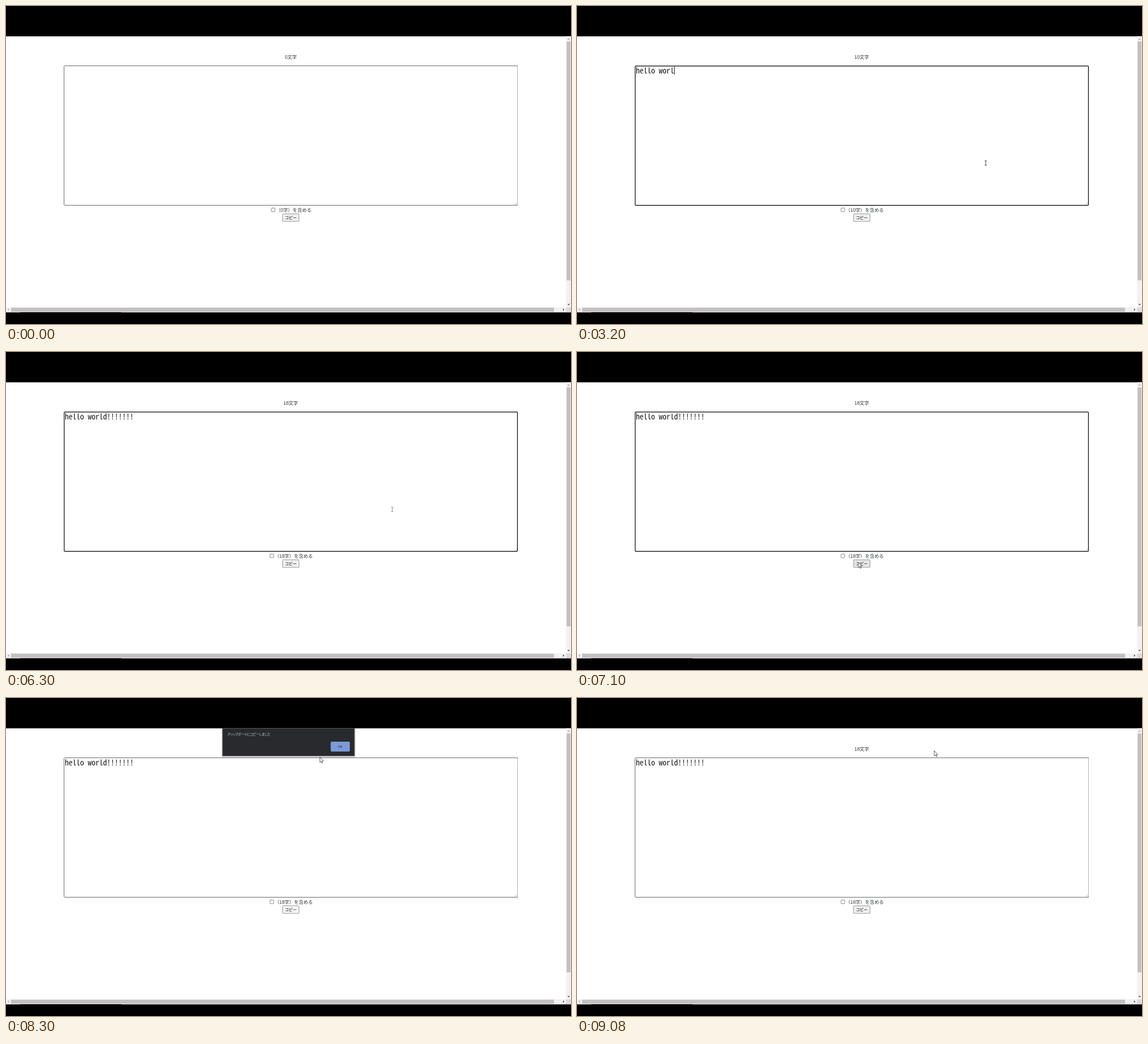
Animation of 998 by 561 pixels, one loop 9.18 s. Source, as an HTML page:

```html
<!DOCTYPE html>
<html lang="ja">
<head>
<meta charset="utf-8">
<title>文字数カウント</title>
<style>
  html, body { margin: 0; width: 100%; height: 100%; overflow: hidden; background: #000; }
  svg { display: block; width: 998px; height: 561px; }
  text { white-space: pre; }
  .label { font: 8.32px "Liberation Sans", "Noto Sans CJK JP", sans-serif; fill: #31383e; text-anchor: middle; }
  .button { font: 500 6.95px "Noto Sans CJK JP", sans-serif; text-anchor: middle; }
  .typed { font: 13.5px "Noto Sans Mono CJK JP", "Noto Sans Mono", monospace; fill: #111; text-anchor: middle; }
  .message { font: 6px "Noto Sans CJK JP", sans-serif; font-feature-settings: "palt"; letter-spacing: -.35px; fill: #c3c6c9; }
  .ok { font: 5.6px "Liberation Sans", sans-serif; fill: #202124; text-anchor: middle; }
</style>
</head>
<body>
<svg viewBox="0 0 998 561">
  <defs><clipPath id="page"><rect y="53.4" width="998" height="487.6"/></clipPath></defs>
  <rect width="998" height="561"/>
  <g clip-path="url(#page)">
    <rect y="53" width="998" height="488" fill="#fff"/>

    <!-- scrollbars -->
    <path d="M989.3 53H998V531.5H989.3ZM0 531.5H989.3V540H0Z" fill="#f1f1f1"/>
    <path d="M989.3 531.5H998V540H989.3Z" fill="#dcdcdc"/>
    <path d="M990.3 62.5H997V484H990.3ZM9 532.2H968V539.2H9Z" fill="#c1c1c1"/>
    <path d="M991.7 59.3H995.9L993.8 57.1ZM5.2 533.5V537.7L3 535.6Z" fill="#a3a3a3"/>
    <path d="M991.7 525.8H995.9L993.8 528ZM983.9 533.5V537.7L986.1 535.6Z" fill="#404040"/>
    <rect y="540" width="998" height="1" fill="#80707a"/>
    <rect x="25" y="540" width="179" height="1" fill="#3a2028"/>

    <text id="counter" class="label" x="503" y="93.4"></text>

    <!-- text area -->
    <g id="blurred" fill="none">
      <path d="M903.5 106V351" stroke="#b5b5b5"/>
      <path d="M904 105.5H103.5Q102.5 105.5 102.5 106.5V350.5Q102.5 351.5 103.5 351.5H904" stroke="#6a6a6a"/>
    </g>
    <rect id="focused" x="102.8" y="105.9" width="800.6" height="245.7" rx="1" fill="none" stroke="#000" stroke-width="1.2"/>
    <path d="M898.5 350.5L902.5 346.5M901 350.5L902.5 349" stroke="#888" stroke-width=".6"/>
    <text id="typed" class="typed" y="118.5"></text>
    <rect id="caret" y="107" width="1" height="14"/>

    <!-- controls -->
    <rect id="box" y="356.4" width="6.4" height="6.4" rx="1.1" fill="#fff" stroke="#666" stroke-width=".8"/>
    <text id="include" class="label" x="508.2" y="362.9"></text>
    <rect id="copy" x="488.6" y="366.6" width="28.9" height="13.4" rx="1" stroke="#808080" stroke-width=".8"/>
    <text class="button" x="503" y="375.9">コピー</text>

    <!-- alert -->
    <g id="alert">
      <path id="shade" fill="none" stroke="#000" stroke-opacity=".22" stroke-width="3"/>
      <path id="panel" fill="#292a2d"/>
      <g id="content">
        <path d="M457.5 52.5V54M462 52.5V54" stroke="#aaa" stroke-width=".8"/>
        <text class="message" x="390.7" y="66.2">クリップボードにコピーしました</text>
        <rect x="573.5" y="77" width="33.8" height="17.4" rx="1.6" fill="#7a9bd6"/>
        <text class="ok" x="590.2" y="87.8">OK</text>
      </g>
    </g>
  </g>

  <g id="pointer">
    <path id="arrow" d="M0 0V9.2L2.1 7.3L3.6 10.6L5 10L3.6 6.8H6.2Z" fill="#fff" stroke="#222" stroke-width=".7"/>
    <path id="ibeam" d="M-2 -4H-.4L0 -3.6L.4 -4H2M0 -3.6V3.6M-2 4H-.4L0 3.6L.4 4H2" fill="none" stroke="#222" stroke-width=".85"/>
  </g>
</svg>
<script>
const LOOP = 9180, TICK = 100, PACE = 155, BLINK = 500;
const ENTER = 300, FOCUS = 700, LEAVE = 6250, PRESS = 7300, OPEN = 7500, CLOSE = 8980, GONE = 9080;
const LEFT = 104, CELL = 6.75, CENTER = 503;

// bursts of typing, each at a steady pace
const BURSTS = [
  { at: 1635, text: 'hello' },
  { at: 2445, text: ' wor' },
  { at: 3200, text: 'ld' },
  { at: 3800, text: '!' },
  { at: 4750, text: '!!!!!!' }
];

// pointer moves along quadratic curves, slowing down
const START = [925, 531];
const MOVES = [
  { from: ENTER, to: FOCUS, bend: [800, 380], end: [722, 277] },
  { from: LEAVE, to: 6800, bend: [606, 267.5], end: [508, 388] },
  { from: 6800, to: 7100, bend: [498, 388], end: [497, 371] },
  { from: 7900, to: 8600, bend: [482, 117], end: [590, 85] },
  { from: 8800, to: 9000, bend: [612, 88], end: [631, 93] }
];

const el = {};
document.querySelectorAll('[id]').forEach(node => el[node.id] = node);
const set = (name, attrs) => {
  for (const key in attrs) el[name].setAttribute(key, attrs[key]);
};
const show = (name, on) => set(name, { visibility: on ? 'inherit' : 'hidden' });
const snap = t => Math.floor(t / TICK) * TICK;

function typing(t) {
  let text = '', last = FOCUS;
  for (const burst of BURSTS) {
    [...burst.text].forEach((char, i) => {
      const time = snap(burst.at + i * PACE);
      if (time <= t) {
        text += char;
        last = time;
      }
    });
  }
  return { text, last };
}

function pointerAt(t) {
  let spot = START;
  for (const { from, to, bend, end } of MOVES) {
    if (t < from) break;
    const u = Math.min(1, (t - from) / (to - from));
    const e = 1 - (1 - u) ** 2;
    spot = spot.map((p, i) => (1 - e) ** 2 * p + 2 * e * (1 - e) * bend[i] + e * e * end[i]);
  }
  return spot;
}

function drawText(text) {
  const count = text.length;
  el.counter.textContent = count + '文字';
  el.include.textContent = `（${count}字）を含める`;
  set('box', { x: CENTER + 2.3 - (el.include.getComputedTextLength() + 10.4) / 2 });
  set('typed', { x: Array.from(text, (_, i) => LEFT + (i + .5) * CELL).join(' ') });
  el.typed.textContent = text;
}

function drawFocus(t, { text, last }) {
  const focused = t >= FOCUS && t < PRESS;
  show('focused', focused);
  show('blurred', !focused);
  show('caret', focused && Math.floor((t - last) / BLINK) % 2 === 0);
  set('caret', { x: LEFT + text.length * CELL });
}

function drawAlert(t) {
  const fading = t < OPEN + TICK || t >= CLOSE;
  const lift = fading ? 5.3 : 0, flare = fading ? .9 : 0;
  const outline = `M382.4 50H615.6L${615.6 + flare} ${102.2 - lift}H${382.4 - flare}Z`;
  show('alert', t >= OPEN && t < GONE);
  set('alert', { opacity: fading ? .45 : 1 });
  set('panel', { d: outline });
  set('shade', { d: outline, transform: 'translate(0 .8)' });
  set('content', { transform: `translate(0 ${-lift})` });
}

function drawPointer(t) {
  const [x, y] = pointerAt(snap(t));
  const within = (left, top, right, bottom) => x > left && x < right && y > top && y < bottom;
  const overText = t < OPEN && within(102, 105, 904, 352);
  const hover = within(488, 366, 518, 380);
  const pressed = t >= PRESS && t < GONE;
  const blurred = t >= LEAVE && t < LEAVE + 1.5 * TICK;
  show('pointer', t >= ENTER);
  show('ibeam', overText);
  show('arrow', !overText);
  set('pointer', { transform: `translate(${x} ${y})`, opacity: blurred ? .6 : 1 });
  set('copy', { fill: pressed ? '#f5f5f5' : hover ? '#e5e5e5' : '#efefef' });
}

function render(t) {
  const typed = typing(t);
  drawText(typed.text);
  drawFocus(t, typed);
  drawAlert(t);
  drawPointer(t);
}

const start = performance.now();
function tick() {
  render((performance.now() - start) % LOOP);
  requestAnimationFrame(tick);
}
tick();
</script>
</body>
</html>
```
